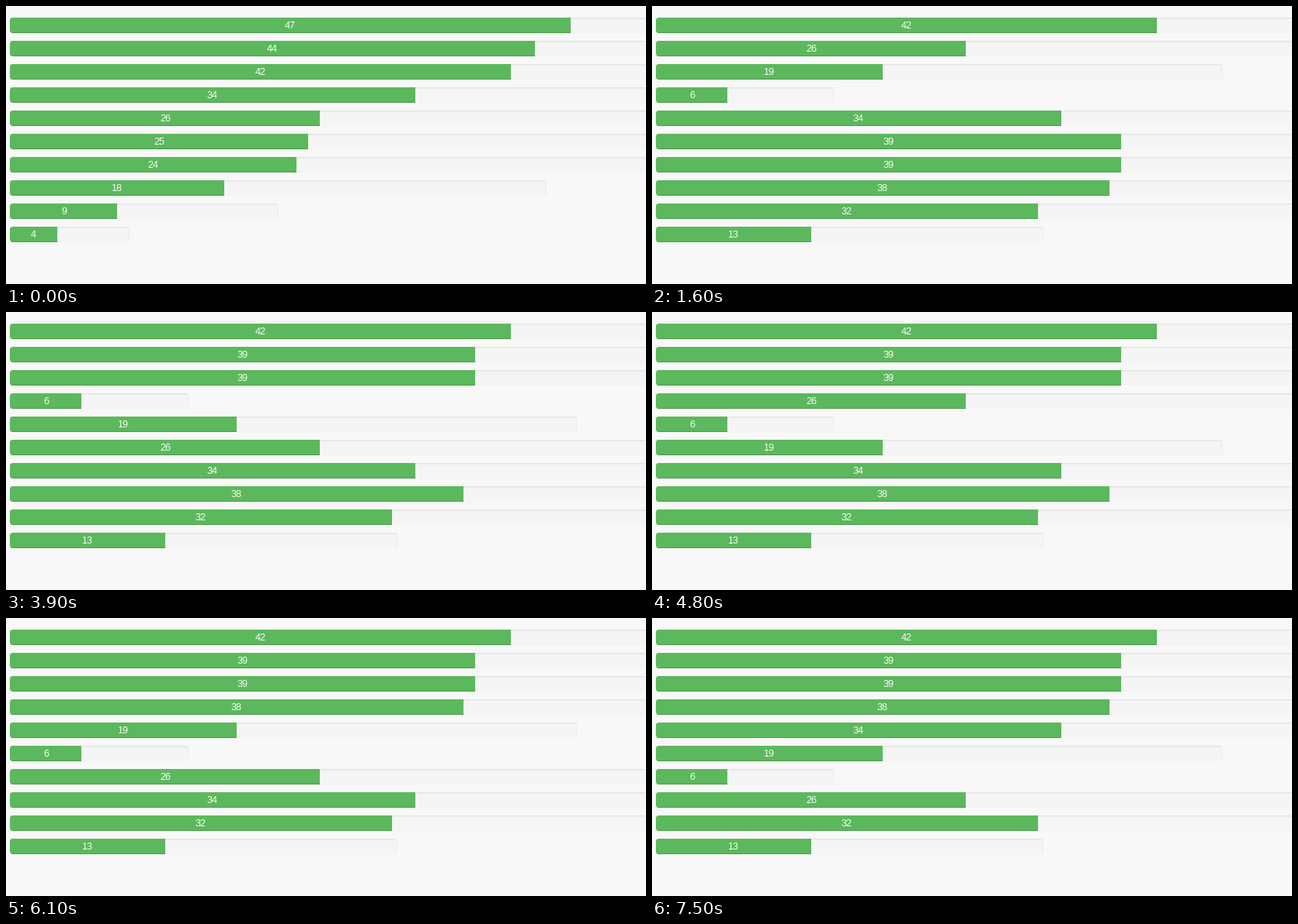
Write a matplotlib script that moves like this. It is 824 by 359 pixels and loops after 8000 ms.

```python
import matplotlib.pyplot as plt
from matplotlib.animation import FuncAnimation
from matplotlib.patches import FancyBboxPatch, Rectangle

W, H, DPI = 824, 359, 64
FRAME_MS, LOOP_MS = 100, 8000
STEP_MS, FIRST_STEP_MS = 457, 603

LEFT, TOP, ROW_H, ROW_GAP = 5, 15, 20, 30
TRACK_UNIT, BAR_UNIT = 38.4, 15.36
PAGE, TRACK, GREEN = "#f8f8f8", "#f5f5f5", "#5cb85c"
TOP_SHADOW = (0.069, 0.031, 0.007)
SIDE_SHADOW = (0.031, 0.007)

SORTED = [47, 44, 42, 34, 26, 25, 24, 18, 9, 4]
SHUFFLED = [34, 19, 26, 6, 42, 39, 39, 38, 32, 13]

plt.rcParams.update({
    "font.family": "Liberation Sans",
    "text.hinting": "native",
    "text.hinting_factor": 1,
    "toolbar": "None",
})


def exchange_sort(values):
    """Every state of a descending exchange sort, one per swap."""
    values = list(values)
    states = [list(values)]
    for i in range(len(values)):
        for j in range(i + 1, len(values)):
            if values[j] > values[i]:
                values[i], values[j] = values[j], values[i]
                states.append(list(values))
    return states


STATES = exchange_sort(SHUFFLED)

fig = plt.figure(figsize=(W / DPI, H / DPI), dpi=DPI, facecolor=PAGE)
ax = fig.add_axes([0, 0, 1, 1])
ax.set(xlim=(0, W), ylim=(H, 0))
ax.axis("off")


def add_rect(x, y, w, h, color, clip, alpha=1):
    rect = ax.add_patch(Rectangle((x, y), w, h, fc=color, lw=0, alpha=alpha))
    rect.set_clip_path(clip)


def draw_row(y, value):
    width = round(value * TRACK_UNIT)
    track = ax.add_patch(FancyBboxPatch(
        (LEFT, y), width, ROW_H, fc=TRACK, lw=0,
        boxstyle="round,pad=0,rounding_size=4"))

    # Inset shadow, soft at the top and right edges
    for k, alpha in enumerate(TOP_SHADOW):
        add_rect(LEFT, y + k, width, 1, "black", track, alpha)
    for k, alpha in enumerate(SIDE_SHADOW):
        add_rect(LEFT + width - 1 - k, y, 1, ROW_H, "black", track, alpha)
    add_rect(LEFT, y + ROW_H - 1, width, 1, "black", track, SIDE_SHADOW[1])

    bar = round(value * BAR_UNIT)
    add_rect(LEFT, y, bar, ROW_H, GREEN, track)
    add_rect(LEFT, y + ROW_H - 1, bar, 1, "black", track, 0.15)

    label = str(value)
    x = round(LEFT + value * BAR_UNIT / 2 - 3.5 * len(label))
    ax.text(x, y + 14, label, color="white", fontsize=12 * 72 / DPI,
            ha="left", va="baseline")


def draw(frame):
    for artist in [*ax.patches, *ax.texts]:
        artist.remove()
    step = (frame * FRAME_MS - FIRST_STEP_MS) // STEP_MS
    values = SORTED if step < 0 else STATES[min(step, len(STATES) - 1)]
    for row, value in enumerate(values):
        draw_row(TOP + row * ROW_GAP, value)
    return []


anim = FuncAnimation(fig, draw, frames=LOOP_MS // FRAME_MS,
                     interval=FRAME_MS, repeat=True, repeat_delay=0)
plt.show()
```
